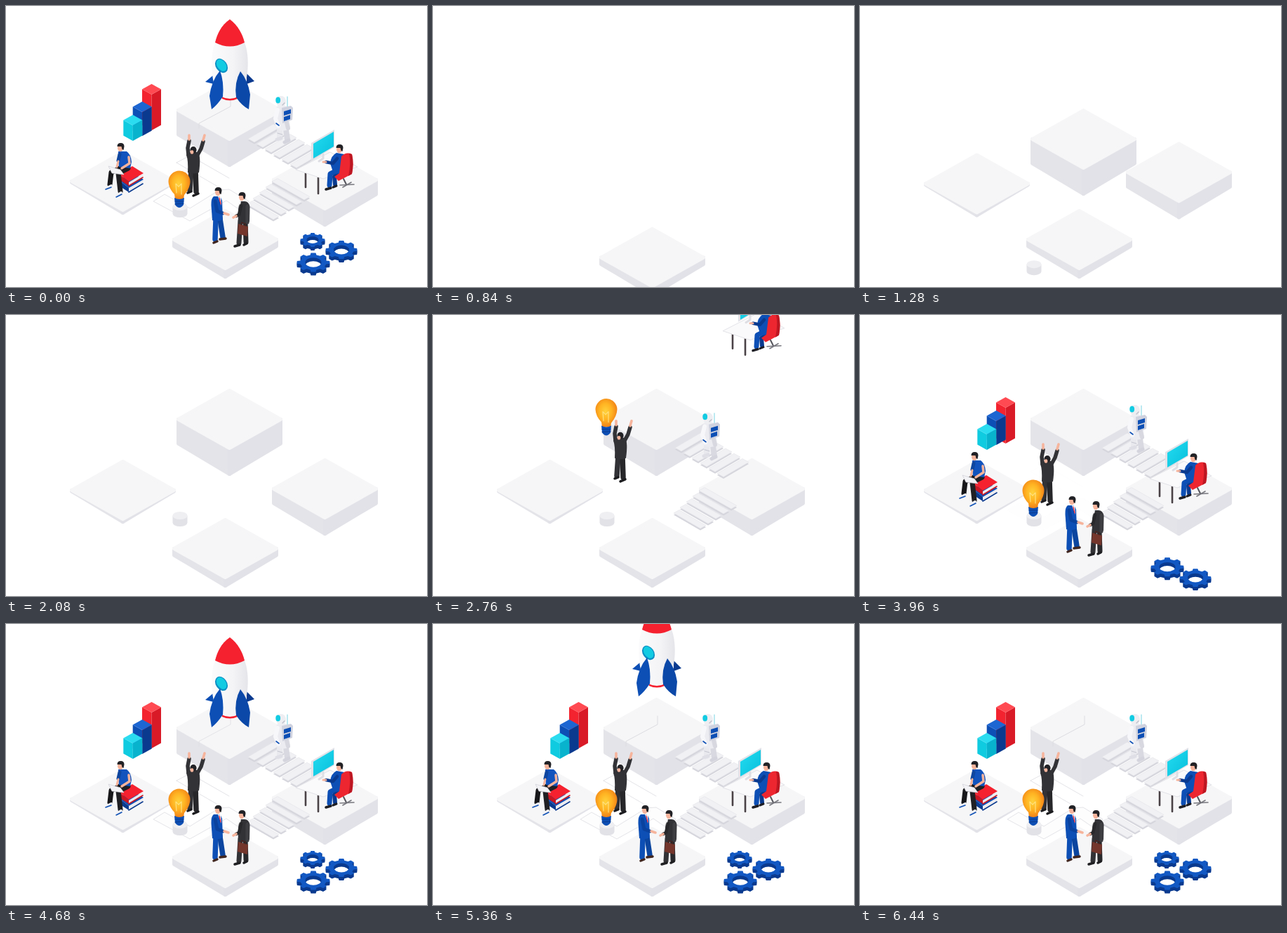
Write an HTML page that moves like this. It is 600x400 px and loops after 6.6 s.

```html
<!DOCTYPE html>
<html lang="en">
<head>
<meta charset="utf-8">
<title>Isometric startup</title>
<style>
  html, body { margin: 0; width: 100%; height: 100%; overflow: hidden; background: #fff; }
  svg { display: block; width: 100vw; height: 100vh; }
</style>
</head>
<body>
<svg id="stage" viewBox="0 0 600 400" xmlns="http://www.w3.org/2000/svg">
  <defs>
    <radialGradient id="glow" cx=".46" cy=".45" r=".58">
      <stop offset="0" stop-color="#ffd23c"/><stop offset=".5" stop-color="#ffb322"/><stop offset="1" stop-color="#f07d16"/>
    </radialGradient>
    <linearGradient id="hull"><stop offset="0" stop-color="#fbfbfc"/><stop offset=".6" stop-color="#f4f4f6"/><stop offset="1" stop-color="#e5e5ea"/></linearGradient>
    <linearGradient id="screen" x2="1" y2="1"><stop offset="0" stop-color="#23dcf0"/><stop offset="1" stop-color="#08bfdc"/></linearGradient>
  </defs>
</svg>
<script>
const LOOP = 6600, INTRO = 680, STEP = 40;
const BLUE = '#0d4fb5', NAVY = '#0a3a8f', RED = '#f5212f', DARK = '#323236', SKIN = '#f6b49c', CYAN = '#12cbe2';
const stage = document.getElementById('stage');

// Shape helpers return markup
const shape = (d, fill, extra = '') => `<path d="${d}" fill="${fill}" ${extra}/>`;
const poly = (pts, fill, extra = '') => `<polygon points="${pts}" fill="${fill}" ${extra}/>`;
const line = (pts, color, w = 1) =>
  `<polyline points="${pts}" fill="none" stroke="${color}" stroke-width="${w}" stroke-linecap="round" stroke-linejoin="round"/>`;
const oval = (x, y, rx, ry, fill, extra = '') => `<ellipse cx="${x}" cy="${y}" rx="${rx}" ry="${ry}" fill="${fill}" ${extra}/>`;

// Isometric box: x and y give the back corner of the top face
function box(x, y, hw, hh, h, [top, left, right], round = 0) {
  const m = y + hh, b = y + 2 * hh;
  const edge = c => round ? `stroke="${c}" stroke-width="${round}" stroke-linejoin="round"` : '';
  const r = round / 2, l = x - hw + r, e = x + hw - r;
  return poly(`${l},${m} ${x},${b - r} ${x},${b + h - r} ${l},${m + h - r}`, left, edge(left)) +
    poly(`${e},${m} ${x},${b - r} ${x},${b + h - r} ${e},${m + h - r}`, right, edge(right)) +
    poly(`${x},${y + r} ${e},${m} ${x},${b - r} ${l},${m}`, top, edge(top));
}
const platform = (x, y, h) => box(x, y, 75.5, 43.5, h, ['#f6f6f7', '#e4e4e9', '#e2e2e8'], 5);

function slab(x, y, dx, dy, wx, wy) {
  const face = k => `${x},${y + k} ${x + dx},${y + dy + k} ${x + dx + wx},${y + dy + wy + k} ${x + wx},${y + wy + k}`;
  return poly(face(2.5), '#d5d5dc') + poly(face(0), '#f1f1f4', 'stroke="#e2e2e7" stroke-width=".6"');
}

function gear(x, y, r, teeth = 8) {
  const ring = dy => {
    let d = '';
    for (let i = 0; i < teeth; i++) {
      [[-.3, .8], [-.19, 1], [.19, 1], [.3, .8]].forEach(([o, k]) => {
        const a = (i + o) * 2 * Math.PI / teeth;
        d += `${d ? 'L' : 'M'}${(x + r * k * Math.cos(a)).toFixed(1)},${(y + dy + r * k * .58 * Math.sin(a)).toFixed(1)}`;
      });
    }
    const q = r * .49, s = q * .58;
    return `${d}ZM${x - q},${y + dy}a${q},${s} 0 1 0 ${2 * q},0a${q},${s} 0 1 0 ${-2 * q},0Z`;
  };
  let out = '';
  for (let k = 5; k > 0; k--) out += shape(ring(k), NAVY, 'fill-rule="evenodd"');
  return out + shape(ring(0), '#1258c3', 'fill-rule="evenodd"');
}

function head(x, y, face = SKIN) {
  return oval(x, y + 1, 4, 5.2, face) +
    shape(`M${x - 4.5},${y - 1}q0,-5 5,-5q5,0 5,5l-1,5l-2,-1l-1,-4z`, '#222226');
}

const blueMan = line('299,304 298,332', BLUE, 7.5) + line('305,303 309,329', '#0b459f', 7.5) +
  line('296,337 301,335', '#402620', 3.5) + line('305,332 313,331', '#402620', 3.5) +
  shape('M296,271Q292,274 292.5,284L294,305Q302,308 309,304L308,277Q306,271 303,271Z', BLUE) +
  poly('302,271 306,272 307,284', '#fff') + line('304,273 306,282', RED, 1.2) +
  line('298,278 301,292 309,295', '#0a429e', 5) + line('311,295 317,297', SKIN, 3.6) + head(302, 264);

const caseMan = line('341,306 342,336', '#29292c', 7) + line('334,306 332,337', DARK, 7) +
  line('326,342 333,340', '#1f1f22', 3.5) + line('339,340 343,338', '#1f1f22', 3.5) +
  shape('M334,278Q330,284 331,309Q341,312 347,307L347.500,286Q346,278 340,278Z', DARK) +
  poly('332,279 335,278 333,288', '#fff') + line('335,284 332,297 328,299', '#28282b', 4.5) +
  line('324,301 328,299', SKIN, 3.6) + line('344,285 344,308', '#3e3e42', 5) +
  poly('331,310 345,314 344,328 330,324', '#74362c') + line('335,311 336,308 341,310 341,313', '#4c221d', 1.2) + head(336, 271);

const cheerMan = line('264,233 262,262', DARK, 7.5) + line('270,233 271,264', '#27272a', 7.5) +
  line('259,266 264,264', '#1c1c1f', 3.5) + line('267,270 274,267', '#1c1c1f', 3.5) +
  shape('M260,208L274,208Q278,215 275,237Q266,240 259,237Q260,220 257,212Z', DARK) +
  line('260,212 259,202 261,192', DARK, 5.5) + line('273,212 278,203 281,193', DARK, 5.5) +
  line('261,190 261,184', SKIN, 3.6) + line('281,191 283,184', SKIN, 3.6) +
  oval(267, 205, 4.6, 5, '#222226') + oval(265, 208, 2.4, 2.8, SKIN);

const block = (y, c, dark) => poly(`161,${y} 180,${y - 11} 196,${y - 1} 175,${y + 11}`, c) +
  poly(`161,${y} 175,${y + 11} 175,${y + 17} 161,${y + 8}`, dark) +
  poly(`175,${y + 12} 195,${y} 195,${y + 5} 175,${y + 17}`, '#ececf0') + line(`175,${y + 17} 195,${y + 5}`, dark, 1.6);
const reader = block(248, BLUE, NAVY) + block(239, RED, '#c91722') +
  line('174,231 160,238 163,264', '#202024', 7) + line('166,229 150,237 148,254', '#17171a', 7) +
  line('144,259 150,256', '#f0f0f3', 4) + line('158,270 164,266', '#f0f0f3', 4) +
  line('142,261 150,258', BLUE, 1.5) + line('157,272 165,268', BLUE, 1.5) +
  shape('M160,207L172,207Q178,211 179,222L177,231L161,229L160,219Z', '#1253bd') +
  line('162,211 160,220', '#0e469f', 5) + line('175,215 176,224 165,231', SKIN, 3.5) + line('160,221 158,229', SKIN, 3) +
  poly('146,228 163,233 168,240 151,238', '#f3f3f6', 'stroke="#cfcfd6" stroke-width=".7"') + head(163, 201);

const desk = line('427,236 427,258', '#4a4246', 2.6) + line('445,244 445,267', '#4a4246', 2.6) +
  poly('413,233 462,208 501,229 452,246', '#fafafb', 'stroke="#e3e3e8" stroke-width="1"') +
  poly('435,195 468,176 468,201 435,220', '#e2e2e8') + poly('438,196 467,179 467,200 438,217', 'url(#screen)') +
  line('452,211 452,217 446,221', '#dedee4', 3) +
  line('470,235 462,239 461,255', BLUE, 7) + line('476,239 468,243 469,254', NAVY, 6) +
  line('456,261 463,259', '#1e1e24', 3.5) + line('466,258 471,256', '#1e1e24', 3) +
  line('481,246 485,254', '#55555c', 2) + line('476,255 496,254', '#77777e', 1.6) + line('480,258 492,251', '#77777e', 1.6) +
  shape('M471,209Q463,213 462,224L467,239L482,238L482,211Z', BLUE) +
  line('472,217 466,224 456,222', NAVY, 4.5) + line('452,222 456,222', SKIN, 3) +
  shape('M478,214Q485,207 493,211Q496,224 493,239L474,249L468,243L475,238Z', '#ed2630') +
  shape('M493,211Q496,224 493,239L488,242Q492,224 489,210Z', '#bd1722') + head(475, 203);

const astronaut = line('390,176 390,188', '#e9e9ee', 8) + line('399,176 401,190', '#d9d9e1', 8) +
  line('386,190 392,188', '#dfdfe6', 5) + line('397,194 403,191', '#d4d4dd', 5) +
  line('401,129 401,144', '#8fdbe8', 1.2) +
  shape('M386,143Q395,139 402,144L405,174Q395,181 385,174L383,155Z', '#ececf1') +
  line('387,148 384,160 388,171', '#f7f7fa', 6) + line('400,166 402,174', '#d8d8e0', 6) +
  poly('393,145 406,142 409,145 408,162 394,167', '#cfd2df') +
  poly('396,150 406,147 406,153 396,156', BLUE) + poly('396,158 405,155 405,161 396,164', BLUE) +
  line('385,167 389,170', BLUE, 1.6) + line('387,181 394,183', '#c4c5d0', 1) +
  oval(392, 136, 7, 8, '#eeeef2') + oval(387.7, 134, 3.4, 4.6, CYAN) + line('394,141 397,138', '#bfc0ca', 1.4);

const bulb = shape('M240,268Q232,260 231.500,250A15.500,15.500 0 0 1 262.500,250Q262,260 254,269L253,275L241,275Z', 'url(#glow)') +
  line('243,266 242,253 246,257 250,253 250,268', '#ffe07c', 1.2) +
  shape('M240,273Q247,277 254,273L253,283Q247,291 241,283Z', BLUE) + line('241,278 253,278', NAVY, 1) + line('241,282 253,281', NAVY, 1);

const drum = shape('M237.500,285.500v10a10.500,5.500 0 0 0 21,0v-10z', '#e2e2e7') + oval(248, 285.5, 10.5, 5.5, '#efeff2');

const rocket = poly('296,98 284,108 296,111', BLUE) + poly('343,96 354,107 343,111', NAVY) +
  shape('M319,19C306,28 300,42 298,52C290,70 292,112 304,130Q319,137 333,130C346,110 348,72 340,52C338,42 331,28 319,19Z', 'url(#hull)') +
  shape('M319,19C306,28 301,40 298,52Q319,63 340,52C337,40 331,28 319,19Z', RED) +
  '<g transform="rotate(-35 307 85)">' + oval(307, 85, 8, 11, '#0d8fc4') + oval(307.5, 84.5, 6.2, 9.3, CYAN) + '</g>' +
  shape('M307,129Q319,135 331,129L330,132Q319,137 308,132Z', RED) +
  shape('M305,92Q293,106 290,128L293,147Q301,141 309,129Q311,108 305,92Z', BLUE) +
  shape('M334,93Q325,109 328,130Q336,142 346,147L348,126Q345,106 334,93Z', '#0b48a8');

const roads = line('243,223 262,213 318,245', '#e4e4e8') + line('243,223 300,256', '#e4e4e8') +
  poly('210,278 226,268 262,288 304,262 318,261 346,278 330,288 314,277 262,306', '#fdfdfd', 'stroke="#e4e4e8" stroke-width="1"');
const track = line('320,131 320,143 275,167 275,174', '#dcdce1');

// Each part: markup, start time, travel offset, duration
const parts = [];
const add = (markup, start, from, dur = 600, fade = false) => {
  const el = document.createElementNS('http://www.w3.org/2000/svg', 'g');
  el.innerHTML = markup;
  stage.append(el);
  parts.push({ el, start, from, dur, fade });
  return el;
};

add(roads, 3920, 0, 600, true);
add(platform(318.5, 105, 37), 1088, 300);
add(track, 4320, 0, 500, true);
add(platform(166.5, 206, 4), 1022, 200);
add(platform(454.5, 204, 23), 898, 200);
add(platform(312.5, 289, 12), 680, 115);
for (let i = 0; i < 6; i++) {
  add(slab(345 + 12 * i, 189 + 7.3 * i, 36, -21, 9, 5), 2240 + i * 50, 0, 200, true);
}
for (let i = 0; i < 5; i++) {
  add(slab(379 - 9 * i, 250 + 8 * i, 46 - 2 * i, 26 - i, 8, -4.5), 2280 + i * 50, 0, 200, true);
}
const ship = add(rocket, 3980, -150, 420);
add(astronaut, 2400, -210);
add(box(207.5, 111, 13.5, 7.5, 51, ['#ff4a52', '#f3232f', '#d91a27']), 3480, -200);
add(box(194.2, 136, 13.5, 7.5, 34, ['#1d66d2', BLUE, NAVY]), 3330, -200);
add(box(180.8, 155, 13.5, 7.5, 22, ['#2bdcf0', '#0fcbe0', '#08b3cd']), 3165, -200);
add(cheerMan, 2560, -280);
add(drum, 1220, 130);
add(bulb, 2650, -290);
add(reader, 3003, -280);
add(desk, 2726, -270);
add(blueMan, 3176, -345);
add(caseMan, 3019, -350);
add(gear(437, 333, 17.5), 3980, 120);
add(gear(478, 347, 22.5), 3801, 120);
add(gear(438, 365, 23.5), 3578, 120);

const LIFT_OFF = 4663;
const remaining = p => { const v = 1 - p; return v * v * (2.2 * v - 1.2); };

function render(now) {
  const t = Math.floor(now % LOOP / STEP) * STEP;
  for (const { el, start, from, dur, fade } of parts) {
    const p = t < INTRO ? 1 : Math.min(1, Math.max(0, (t - start) / dur));
    let y = from * remaining(p);
    if (el === ship && t > LIFT_OFF) y = -44 * ((t - LIFT_OFF) / 697) ** 2;
    el.setAttribute('visibility', t < INTRO || t >= start ? 'visible' : 'hidden');
    el.setAttribute('transform', `translate(0 ${y.toFixed(2)})`);
    if (fade) el.setAttribute('opacity', p);
  }
}

const begin = performance.now();
function tick() {
  render(performance.now() - begin);
  requestAnimationFrame(tick);
}
tick();
</script>
</body>
</html>
```
